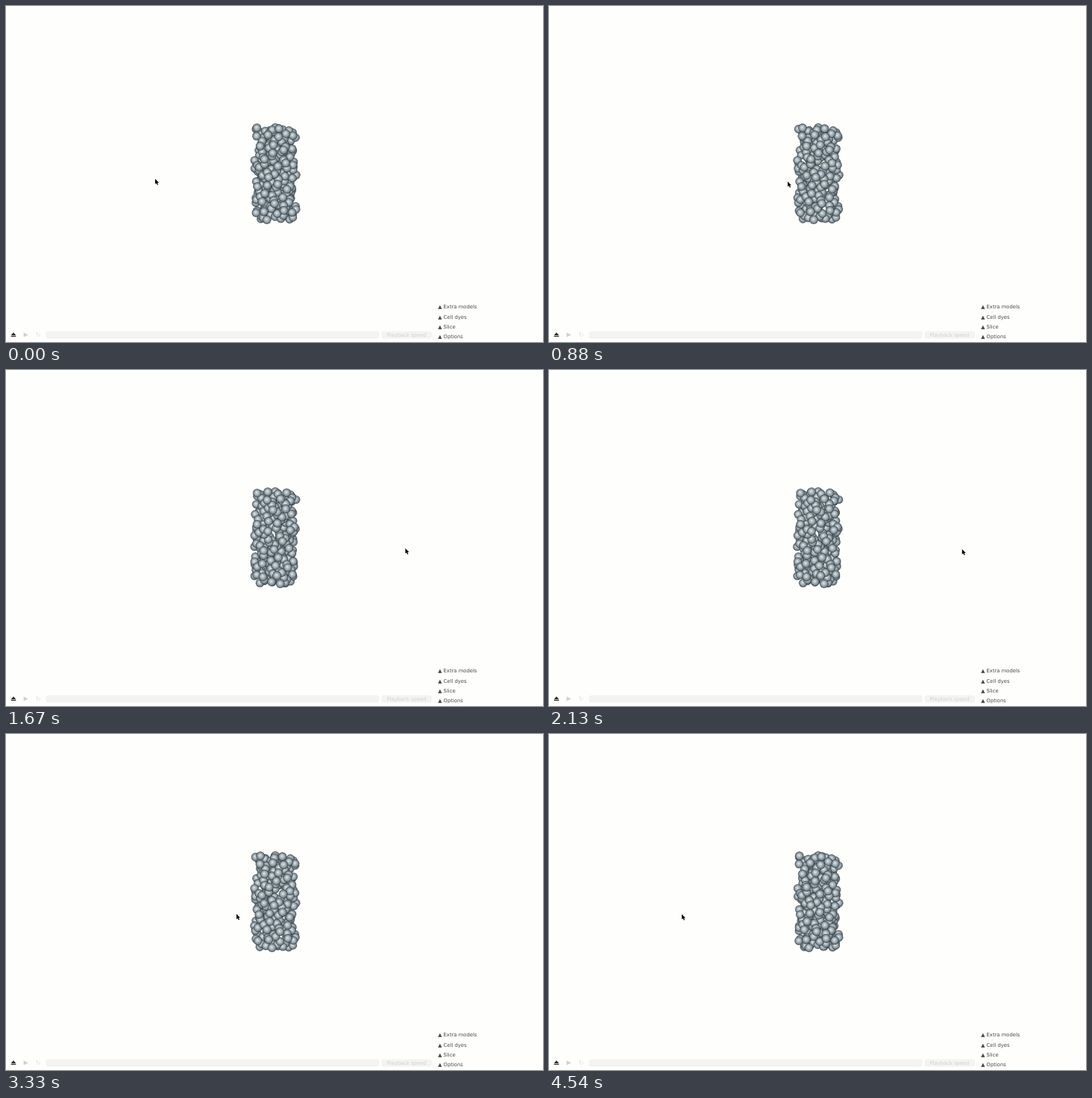
Recreate the animation shown at these times as an HTML page with a canvas. Size 720 by 450 pixels, loop 5 s.

```html
<!DOCTYPE html>
<html lang="en">
<head>
<meta charset="utf-8">
<title>Cell column</title>
<style>
  html, body { margin: 0; width: 100%; height: 100%; overflow: hidden; background: #fefefd; }
  canvas, svg { position: absolute; left: 0; top: 0; width: 720px; height: 450px; }
  text { font: 6.8px "DejaVu Sans", sans-serif; fill: #484848; white-space: pre; }
  .faint { fill: #d0d0ce; text-anchor: middle; }
</style>
</head>
<body>
<canvas id="stage" width="720" height="450"></canvas>
<svg viewBox="0 0 720 450">
  <text x="579.2" y="405.3">▲ Extra models</text>
  <text x="579.2" y="418.6">▲ Cell dyes</text>
  <text x="579.2" y="431.9">▲ Slice</text>
  <text x="579.2" y="445.2">▲ Options</text>
  <path d="M10 437.2L13.3 440.9H6.7ZM6.7 441.7H13.3V443H6.7Z" fill="#2a2a2a"/>
  <path d="M23.6 437.3L29.6 440.4L23.6 443.5Z" fill="#d0d0ce"/>
  <text class="faint" x="43.3" y="443.4" style="font-size:8.5px;fill:#e0e0de">↻</text>
  <g fill="#f4f4f3" stroke="#eeeeed" stroke-width=".7">
    <rect x="54" y="436.2" width="446" height="8.6" rx="2.5"/>
    <rect x="504" y="436.2" width="66.5" height="8.6" rx="2.5"/>
  </g>
  <text class="faint" x="537" y="442.8">Playback speed</text>
  <path id="cursor" d="M0 0V7L1.6 5.6L2.8 8.2L4 7.7L2.9 5.2H5Z" fill="#000" stroke="#fff" stroke-width=".6" paint-order="stroke"/>
</svg>
<script>
const ctx = document.getElementById('stage').getContext('2d');
const cursor = document.getElementById('cursor');
const LOOP = 5000, TICK = 65, PHASE = 15;
const AXIS = 360, TOP = 162.5, HEIGHT = 124, RADIUS = 29.5, COUNT = 240;
const START_X = 200, TURN_PER_PX = 0.7 / 354;

// Pointer drag: time, x
const drag = [[500, START_X], [860, 320], [1315, 494], [1580, 533], [2100, 554],
  [2520, 554], [3330, 309], [3915, 188], [4200, 178]];

let seed = 29;
const random = () => (seed = (seed * 16807) % 2147483647) / 2147483647;

// Balls spiral down a cylinder by the golden angle, at random depths
const balls = Array.from({ length: COUNT }, (_, i) => {
  const r = RADIUS * random() ** 0.4;
  const a = i * 2.39996 + random() * 0.5;
  return { x: r * Math.cos(a), y: TOP + HEIGHT * (i + 0.5) / COUNT, z: r * Math.sin(a) };
});

function pointerX(t) {
  const next = drag.findIndex(([time]) => time > t);
  if (next === 0) return START_X;
  if (next < 0) return drag[drag.length - 1][1];
  const [t0, x0] = drag[next - 1], [t1, x1] = drag[next];
  return x0 + (x1 - x0) * (t - t0) / (t1 - t0);
}

// The pointer sinks slowly while it is dragged
const pointerY = t => 231.6 + 9.8 * (1 - Math.exp(-Math.max(0, t - 500) / 850));

function drawBall({ x, y, z }) {
  const r = 5.5 + z * 0.012;
  const g = ctx.createRadialGradient(x - 0.7, y - 0.9, 0.3, x, y, r);
  g.addColorStop(0, '#dae2e5');
  g.addColorStop(0.35, '#b3bfc4');
  g.addColorStop(0.7, '#87949b');
  g.addColorStop(0.9, '#59646b');
  g.addColorStop(1, '#353e43');
  ctx.beginPath();
  ctx.arc(x, y, r, 0, 2 * Math.PI);
  ctx.fillStyle = g;
  ctx.fill();
  ctx.strokeStyle = 'rgba(35,44,50,.25)';
  ctx.lineWidth = 0.7;
  ctx.stroke();
}

function draw(now) {
  const t = Math.floor((now % LOOP - PHASE) / TICK) * TICK + PHASE;
  // Pauses hold the pointer height as well
  const moving = t > 2100 && t < 2520 ? 2100 : Math.min(t, 4200);
  cursor.setAttribute('transform', `translate(${pointerX(t)} ${pointerY(moving)})`);

  // The view follows the pointer one tick late
  const angle = (pointerX(t - TICK) - START_X) * TURN_PER_PX;
  const c = Math.cos(angle), s = Math.sin(angle);
  ctx.clearRect(0, 0, 720, 450);
  balls.map(({ x, y, z }) => ({ x: AXIS + x * c + z * s, y, z: z * c - x * s }))
    .sort((a, b) => a.z - b.z)
    .forEach(drawBall);
}

const begin = performance.now();
function frame() {
  draw(performance.now() - begin);
  requestAnimationFrame(frame);
}
frame();
</script>
</body>
</html>
```
